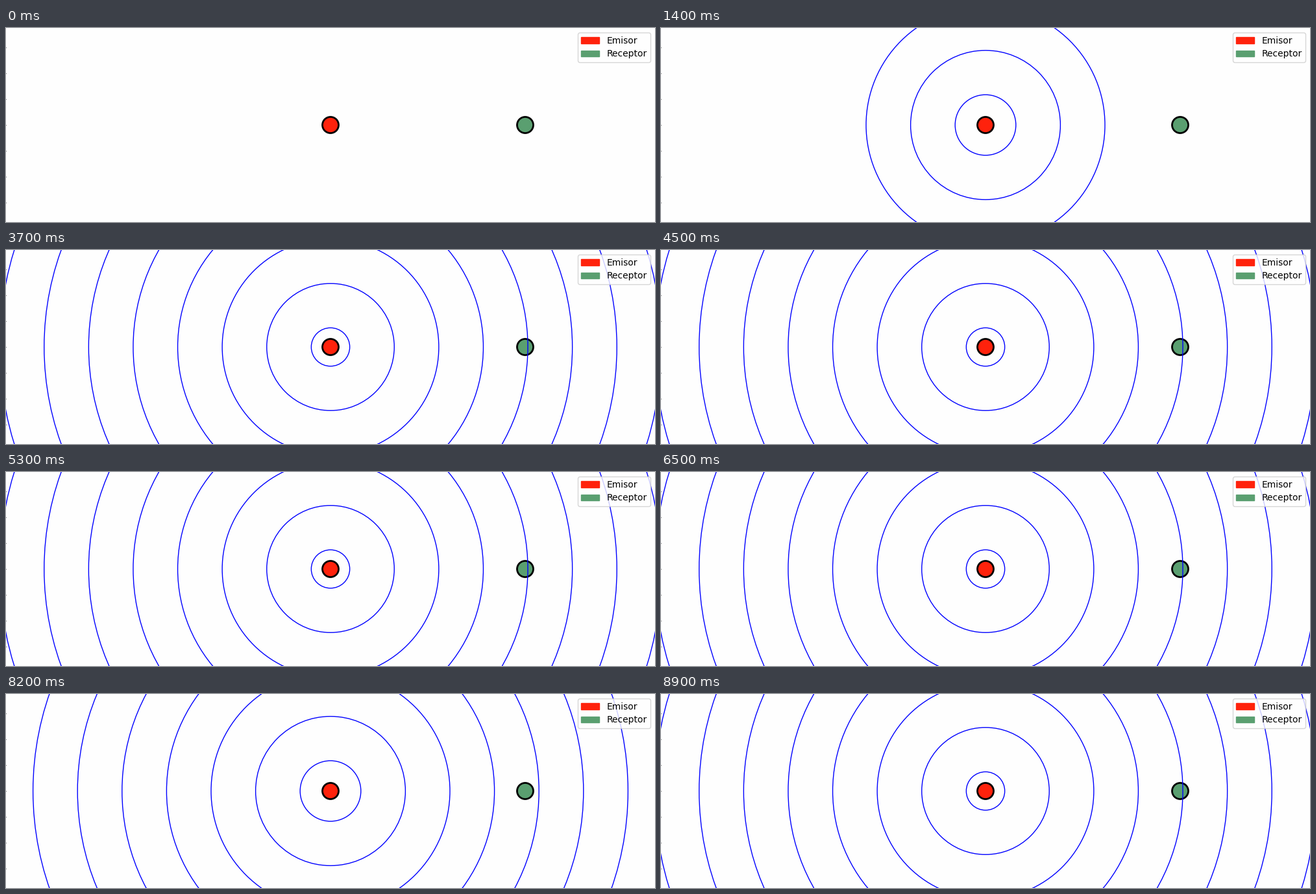
A matplotlib script that plays this animation: 1000x300 px, repeating every 9 s.

```python
import matplotlib.pyplot as plt
from matplotlib.animation import FuncAnimation
from matplotlib.patches import Circle, Patch

plt.rcParams["font.family"] = "DejaVu Sans"

W, H, DPI = 1000, 300, 100
FRAMES, INTERVAL = 90, 100
RADIUS = 12.5       # dot radius, also the radius of a newborn wave
SPEED = 343 / 20    # pixels per frame
PERIOD = 4          # frames between waves, also the first emission
RED, GREEN, PAPER = "#ff220c", "#5a9f70", "#fefefe"

fig = plt.figure(figsize=(W / DPI, H / DPI), dpi=DPI, facecolor=PAPER)
ax = fig.add_axes([0, 0, 1, 1], facecolor=PAPER)
ax.set(xlim=(-W / 2, W / 2), ylim=(-H / 2, H / 2),
       xticks=[], yticks=range(-120, 121, 40))
ax.tick_params(labelleft=False)
ax.spines[:].set_visible(False)


def add_dot(x, color):
    ax.add_patch(Circle((x, 0), RADIUS, fc=color, ec="black", lw=2))


add_dot(0, RED)
add_dot(300, GREEN)

waves = [ax.add_patch(Circle((0, 0), RADIUS, fill=False, ec="blue", lw=1,
                             visible=False))
         for _ in range(9)]

ax.legend(handles=[Patch(color=RED, label="Emisor"),
                   Patch(color=GREEN, label="Receptor")],
          loc="upper right", fontsize=10)


def update(frame):
    elapsed = frame - PERIOD
    for i, wave in enumerate(waves):
        age = elapsed % PERIOD + PERIOD * i
        wave.set_radius(RADIUS + SPEED * age)
        wave.set_visible(age <= elapsed)
    return waves


anim = FuncAnimation(fig, update, frames=FRAMES, interval=INTERVAL,
                     repeat=True, repeat_delay=0, blit=False)
plt.show()
```
